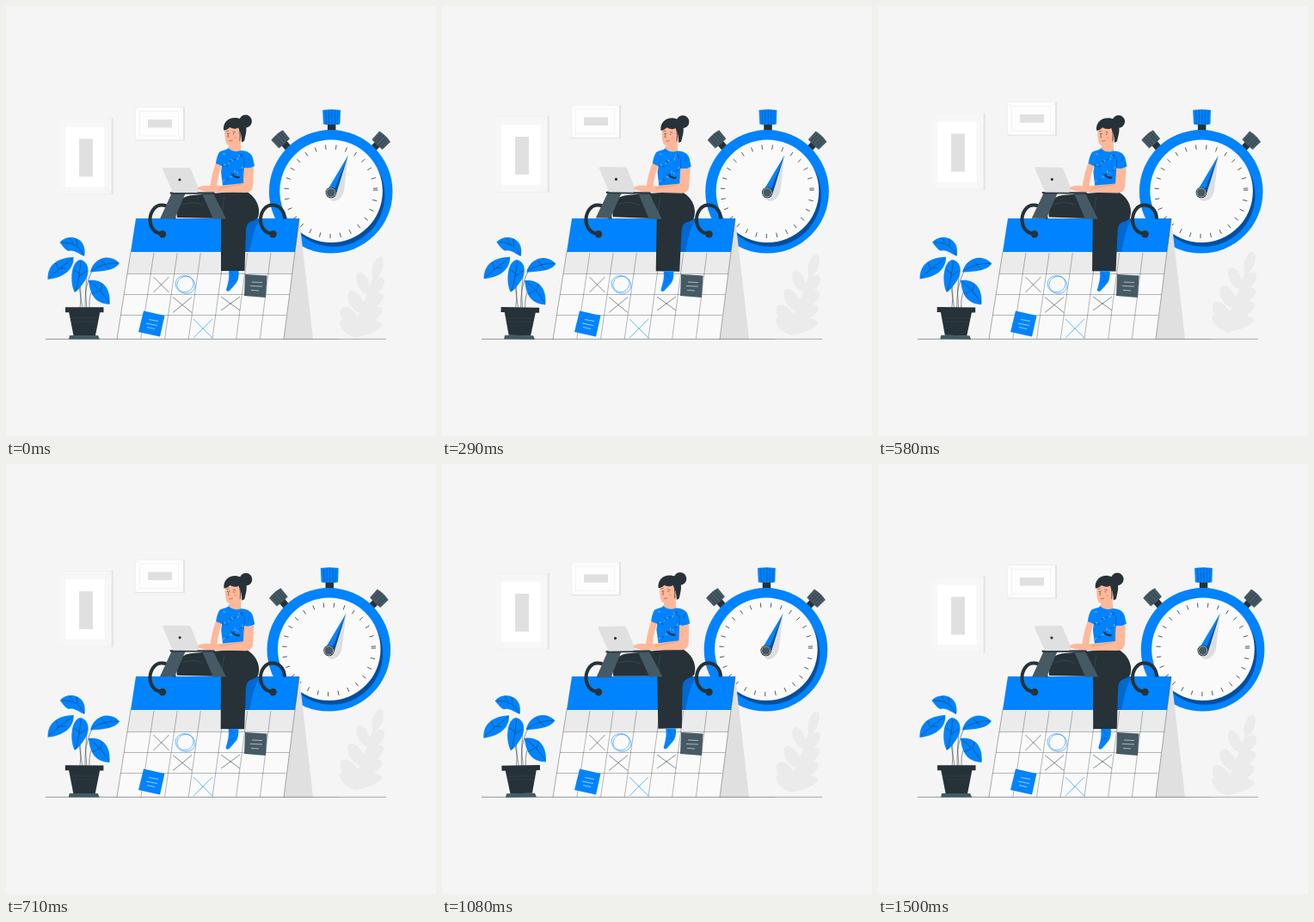
An HTML page with a canvas for the animation above (1540 ms loop, 500 px wide and 500 px high).

```html
<!DOCTYPE html>
<html lang="en">
<head>
<meta charset="utf-8">
<title>Time management</title>
<style>
html, body { margin: 0; width: 100%; height: 100%; overflow: hidden; background: #f5f5f5; }
canvas { display: block; width: 500px; height: 500px; }
</style>
</head>
<body>
<canvas id="stage"></canvas>
<script>
const LOOP = 1540;
const BLUE = '#0083ff', DEEP = '#004f9e', DARK = '#263238', SLATE = '#455a64', SKIN = '#ffb89a';
const canvas = document.getElementById('stage');
const ratio = window.devicePixelRatio || 1;
canvas.width = canvas.height = 500 * ratio;
const ctx = canvas.getContext('2d');

function fill(d, color) {
  ctx.fillStyle = color;
  ctx.fill(new Path2D(d));
}

function line(d, color = DARK, width = 0.6) {
  ctx.strokeStyle = color;
  ctx.lineWidth = width;
  ctx.stroke(new Path2D(d));
}

function rect(x, y, w, h, color) {
  ctx.fillStyle = color;
  ctx.fillRect(x, y, w, h);
}

function oval(x, y, rx, ry, color, turn = 0) {
  ctx.fillStyle = color;
  ctx.beginPath();
  ctx.ellipse(x, y, rx, ry, turn, 0, 7);
  ctx.fill();
}

const disc = (x, y, r, color) => oval(x, y, r, r, color);

function ring(x, y, rx, ry, color, width, turn = 0) {
  ctx.strokeStyle = color;
  ctx.lineWidth = width;
  ctx.beginPath();
  ctx.ellipse(x, y, rx, ry, turn, 0, 7);
  ctx.stroke();
}

function moved(dx, dy, draw) {
  ctx.save();
  ctx.translate(dx, dy);
  draw();
  ctx.restore();
}

function turned(x, y, angle, draw) {
  ctx.save();
  ctx.translate(x, y);
  ctx.rotate(angle);
  ctx.translate(-x, -y);
  draw();
  ctx.restore();
}

// Horizontal drift of the stopwatch through [time, offset] knots
const watchPath = [[-40, 0.3], [270, 1], [460, -1.2], [700, -2], [1080, -0.8], [1330, -0.2], [1500, 0.3], [1810, 1]];
function watchShift(t) {
  const i = watchPath.findIndex(([time]) => time > t);
  const [t0, a] = watchPath[i - 1], [t1, b] = watchPath[i];
  return a + (b - a) * (t - t0) / (t1 - t0);
}

function pictures() {
  rect(63, 130.5, 59.5, 89, '#f7f7f7');
  line('M63 131H122 M69 140L63 131 M115 140L122 131 M69 210L63 219H122L115 210', '#eeeeee', 0.7);
  rect(122.5, 130.5, 2.5, 89, '#e6e6e6');
  rect(69, 140.5, 45.5, 70, '#fff');
  rect(85, 154.5, 16, 44, '#e0e0e0');

  rect(150, 117.6, 58, 39, '#e3e3e3');
  rect(150.5, 118, 55.5, 37.5, '#fdfdfd');
  line('M155.5 122.5H200.5V151H155.5Z M151 118.5L155.5 122.5 M206 118.5L200.5 122.5 M151 155.5L155.5 151 M206 155.5L200.5 151', '#f0f0f0', 0.8);
  rect(165, 132, 28, 9.5, '#e0e0e0');
}

function bush() {
  const leaf = '#ebebeb';
  line('M407 383C412 358 425 330 432 305', leaf, 4);
  oval(432, 304, 5.8, 13, leaf, 0.3);
  oval(415, 322, 6.5, 13, leaf, -0.4);
  oval(430, 326, 7, 13, leaf, 0.75);
  oval(407, 344, 7.5, 14, leaf, -0.55);
  oval(426, 344, 7.5, 15, leaf, 0.95);
  oval(400, 363, 8.5, 15, leaf, -0.65);
  oval(422, 360, 8, 17, leaf, 1.1);
  fill('M388 367C393 362 404 366 408 373C416 363 434 364 438 371C432 380 420 382 407 385.5C396 383 389 376 388 367Z', leaf);
}

function knob(x, y, angle) {
  ctx.save();
  ctx.translate(x, y);
  ctx.rotate(angle);
  rect(-4, 5, 8, 9, DARK);
  fill('M-9 -6.5Q0 -8.5 9 -6.5L8.5 6.5Q0 7.5 -8.5 6.5Z', SLATE);
  line('M-5 -6V6M-2 -7V6M2 -7V6M5 -6V6', DARK, 0.6);
  ctx.restore();
}

function stopwatch() {
  knob(319, 155, -0.72);
  knob(435.7, 156.5, 0.77);
  rect(373.5, 136, 9.5, 10, DARK);
  fill('M367.8 121Q378 119.5 388.6 121L388 137.5Q378 138.5 368.6 137.5Z', BLUE);
  line('M371.5 122L372 138M375 121V138M378.5 120.5V138M382 121V138M385.5 122L385 138', DEEP, 0.6);
  disc(377.3, 215.8, 71.8, BLUE);
  disc(380.3, 220, 59.8, DEEP);
  disc(377.7, 215.3, 59.8, '#fafafa');
  for (let i = 0; i < 28; i++) {
    const a = (86 - i * 13.25) * Math.PI / 180, s = Math.sin(a), c = -Math.cos(a);
    line(`M${377.5 + 49.2 * s} ${215.7 + 49.2 * c}L${377.5 + 54.5 * s} ${215.7 + 54.5 * c}`, DARK, 0.8);
  }
  fill('M397 177L393 212C392 222 386 227 380 227C373 225 374 217 378 212Z', '#dedede');
  fill('M397.5 173.5L374 213L381 217Z', BLUE);
  fill('M397.5 173.5L381 215L384 217Z', DEEP);
  disc(377.5, 217, 6.3, DARK);
  disc(377.5, 217, 5.4, '#d5d8da');
  disc(377.5, 217, 4.8, SLATE);
}

// Left edge of the sloping page at height y
const edge = y => 151 - (y - 247) * 22 / 141;

function calendar() {
  fill('M341 247L357 387.5H323Z', '#e0e0e0');
  fill('M151 247H341L323 387.5H129Z', '#fafafa');
  fill('M145 286H336L332.8 311H141Z', '#ebebeb');
  fill('M151 247H341L336 286H145Z', BLUE);
  line('M341 247L323 387.5M145 286L129 387.5', DARK, 0.4);
  for (const y of [311.5, 335.5, 359.5])
    line(`M${edge(y)} ${y}H${edge(y) + 192}`, DARK, 0.35);
  for (let i = 1; i < 7; i++)
    line(`M${edge(287) + i * 27.2} 287L${edge(387) + i * 27.7} 387`, DARK, 0.35);

  const cross = (x, y, w, h, color) =>
    line(`M${x - w} ${y - h}Q${x} ${y} ${x + w} ${y + h}M${x + w} ${y - h}Q${x} ${y} ${x - w} ${y + h}`, color, 0.55);
  cross(180.5, 324, 9, 9, DARK);
  cross(205, 347.5, 11, 9, DARK);
  cross(261, 346, 11, 8, DARK);
  cross(229, 375, 11, 11, BLUE);
  ring(208.5, 324, 11.6, 10.2, BLUE, 0.55, 0.4);
  ring(208.5, 323.5, 9.8, 9, BLUE, 0.55, -0.6);

  fill('M278 312L303.5 313.5L302 339L277 337Z', SLATE);
  line('M286 321L298 321.5M284 325.5L298 326M285 330.5L294 331', '#e0e0e0', 0.7);
  fill('M160 354.5L184.5 360L179 384.5L154 379Z', BLUE);
  line('M166 364.5L177 366.5M163 369L176 371.5M164 373.5L173 375.5', '#fff', 0.6);
  fill('M277 286V247H298C288 254 287 270 283 286Z', '#0068cf');
}

function hook(x) {
  line(`M${x + 14.5} 247.5C${x + 14.5} 237.5 ${x + 8} 231.6 ${x} 231.6C${x - 8} 231.6 ${x - 13.5} 239.5 ${x - 13.5} 248.5C${x - 13.5} 257.5 ${x - 8} 264.5 ${x} 264.5`, DARK, 4);
  disc(x + 1, 265.2, 4.2, DARK);
}

function plant() {
  line('M83 304Q89 330 86 352M85 326L89 352M94 312Q91 332 94 352M100 308Q91 325 92 352M104 325Q96 332 97 352', DARK, 0.5);
  const leaf = (d, vein) => { fill(d, BLUE); line(vein, DARK, 0.5); };
  leaf('M62.5 275C69 267 83 267 89 276C92 281 92 287 91 291C84 288 79 283 73 285C69 284 66 279 62.5 275Z', 'M65 275Q83 274 91 290M74 270L78 276M82 271L83 279');
  leaf('M48.5 318C48 305 55 293 78.5 292C79 303 72 315 48.5 318Z', 'M50 316Q63 304 77 294M58 299L61 307M70 305L63 305');
  leaf('M98 309.5C101 294 119 286 132 299C126 308 113 308 98 309.5Z', 'M99 308Q113 298 130 299M111 296L116 301M120 306L115 301');
  leaf('M86 295C95 296 99 308 92 319C88 325 85 330 80 333C74 322 75 298 86 295Z', 'M87 297Q85 318 81 331M79 307L85 311M94 308L85 314');
  leaf('M96 319C111 317 122 326 120.5 347C106 346 98 339 96 319Z', 'M97 320Q110 329 120 345M112 323L110 331M100 335L108 331');
  fill('M74 383H107L109 387.5H73Z', SLATE);
  fill('M73 355H109.5L104 383H78.5Z', DARK);
  rect(69, 350.3, 44.5, 6, DARK);
  line('M75 363H107M76 367H106', '#37474f', 0.5);
}

function pants() {
  fill('M199 246C197 230 203 221 217 220L251 217L278 215C291 221 297 235 293 246C287 253 280 247 279 262L277.5 308H250V247Z', DARK);
  line('M205 231Q219 226 230 232M254 222Q250 237 253 247', SLATE, 0.5);
  fill('M259 308H270.5C271 314 270.5 319 267 323L260 331Q257 333 256 330C258 323 260 317 259 308Z', BLUE);
  line('M262 310L266 316M261 321L267 318', DEEP, 0.6);
}

function head() {
  disc(278.5, 134, 7.4, DARK);
  fill('M260 156H273V168Q265 171 259 166Z', SKIN);
  fill('M254.5 142C254 148 254.5 157 257 161C262 164 270 160 273 155L274 138H256Z', SKIN);
  fill('M253 144.5C252 135 259 129 268 130C277 131 281 139 279 148L277 157L274 158.5C274 152 273 146 270 141.5C266 144 262 142 260 141C258 143 256 144.5 253 144.5Z', DARK);
  line('M271.5 143Q272.5 150 272 157', DARK, 0.8);
  line('M256 145.5L259 145M263.5 146L267 147M259.5 147L257.7 152L259.5 152.5', DARK, 0.5);
  disc(257.5, 148.3, 0.6, DARK);
  disc(264.5, 148.8, 0.6, DARK);
  oval(266.5, 153, 1.6, 1, '#ff9a80');
  line('M259 156.5Q261 157.5 263.5 156', '#b84634', 0.7);
}

function torso() {
  fill('M245 180L251 184L246 202L245 215L237 211C239 199 241 189 245 180Z', SKIN);
  fill('M248 170C252 167 259 168 259.5 163Q266 161.5 272.5 163L273 168C281 168 286 172 287 177L289 186Q283 190 277 188L276 207Q263 211 252 209L250 193L251 186L244 183Q245 175 248 170Z', BLUE);
  for (let i = 0; i < 22; i++) {
    const x = 252 + i * 7 % 24, y = 172 + i * 11 % 31, a = i * 2.4;
    line(`M${x} ${y}l${3 * Math.cos(a)} ${3 * Math.sin(a)}`, i % 2 ? DARK : '#b3daff', 0.6);
  }
  line('M260.5 167L272 167.5M277 177V188M283 175L282 180', DEEP, 0.6);
  fill('M261 194Q267 199 272 198L271 200.5Q264 200.5 261 194Z', DARK);
  fill('M277 188Q282 190 288 187L287 210Q286 216 279 217L241 216.5Q228 216 223 213Q226 209 237 210L248 209L276 206Z', SKIN);
  line('M276 193V206M274 207Q259 210 248 212M224 212L235 211.5', '#d98069', 0.5);
}

function worker() {
  pants();
  torso();
  head();
  fill('M193 217H209L196 247.5H179Z', SLATE);
  fill('M228 218H241L256 247.5H241Z', SLATE);
  fill('M190.5 216.5H242L244 218.8H191Z', DARK);
  line('M192 217H241', SLATE, 1);
  fill('M182.5 188H212Q214 188 215 190L225 214.5L222 217H194L182 189.5Z', '#e0e0e0');
  disc(202, 202, 1.6, DARK);
  fill('M223 211Q231 207 240 210L242 216Q232 216 223 213Z', SKIN);
}

function render(t) {
  const phase = 2 * Math.PI / LOOP;
  const lift = 3.25 * (Math.cos((t + 40) * phase) - 1);
  const sway = Math.sin(t * phase) * Math.PI / 180;
  ctx.setTransform(ratio, 0, 0, ratio, 0, 0);
  rect(0, 0, 500, 500, '#f5f5f5');
  moved(0, lift, () => { pictures(); bush(); });
  moved(watchShift(t), 0, stopwatch);
  calendar();
  line('M46 387.3H387', DARK, 0.5);
  line('M387 387.3H442', DARK, 0.4);
  hook(181);
  turned(90, 328, sway, plant);
  turned(238, 229, sway, worker);
  hook(309.5);
}

function tick(now) {
  render(now % LOOP);
  requestAnimationFrame(tick);
}
render(0);
requestAnimationFrame(tick);
</script>
</body>
</html>
```
